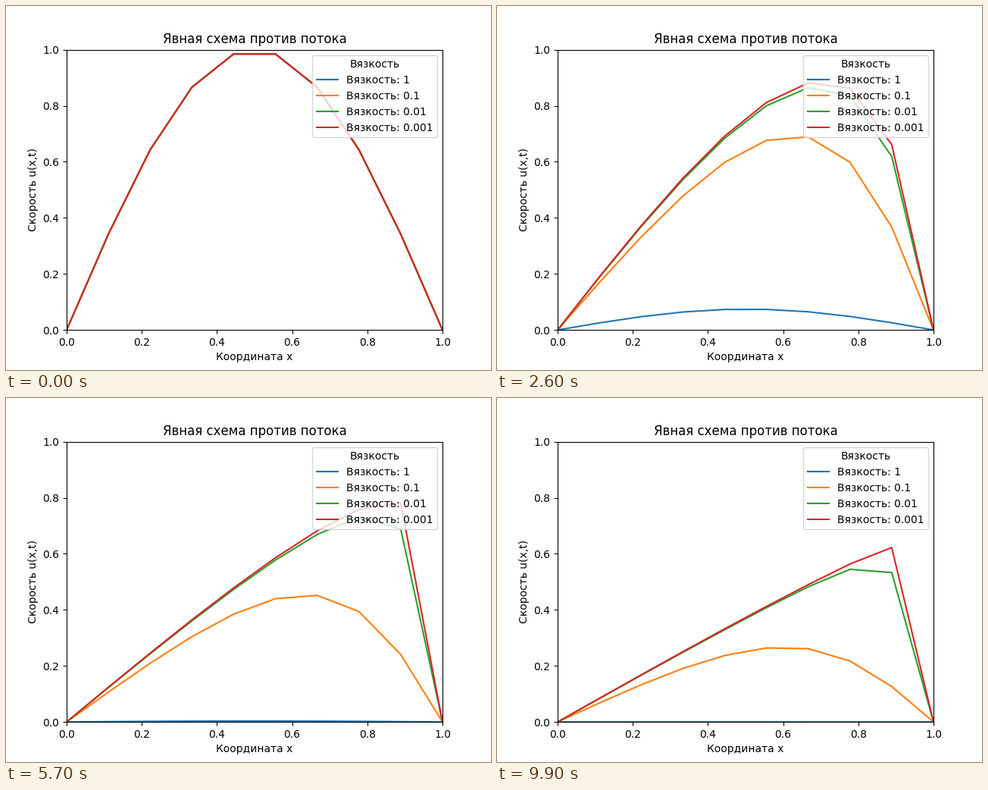
Recreate the animation shown at these times as a matplotlib script. Size 640 by 480 pixels, loop 10 s.

```python
import numpy as np
import matplotlib.pyplot as plt
from matplotlib.animation import FuncAnimation

NODES = 10
DT = 0.001
STEPS_PER_FRAME = 10
FRAMES = 100
VISCOSITIES = [1, 0.1, 0.01, 0.001]

x = np.linspace(0, 1, NODES)
h = x[1] - x[0]


def step(u, nu):
    """One explicit upwind step of the viscous Burgers equation."""
    new = np.zeros_like(u)
    mid = u[1:-1]
    advection = mid * (mid - u[:-2]) / h
    diffusion = nu * (u[2:] - 2 * mid + u[:-2]) / h**2
    new[1:-1] = mid + DT * (diffusion - advection)
    return new


def solve(nu):
    u = np.sin(np.pi * x)
    u[0] = u[-1] = 0
    history = [u]
    for _ in range(FRAMES - 1):
        for _ in range(STEPS_PER_FRAME):
            u = step(u, nu)
        history.append(u)
    return history


solutions = [solve(nu) for nu in VISCOSITIES]

plt.rcParams["font.family"] = "DejaVu Sans"
fig, ax = plt.subplots(figsize=(6.4, 4.8), dpi=100)
lines = [ax.plot(x, s[0], label=f"Вязкость: {nu}")[0]
         for nu, s in zip(VISCOSITIES, solutions)]
ax.set_xlim(0, 1)
ax.set_ylim(0, 1)
ax.set_title("Явная схема против потока")
ax.set_xlabel("Координата x")
ax.set_ylabel("Скорость u(x,t)")
ax.legend(title="Вязкость", loc="upper right")


def update(frame):
    for line, s in zip(lines, solutions):
        line.set_ydata(s[frame])
    return lines


anim = FuncAnimation(fig, update, frames=FRAMES, interval=100,
                     repeat=True, repeat_delay=0)
plt.show()
```
